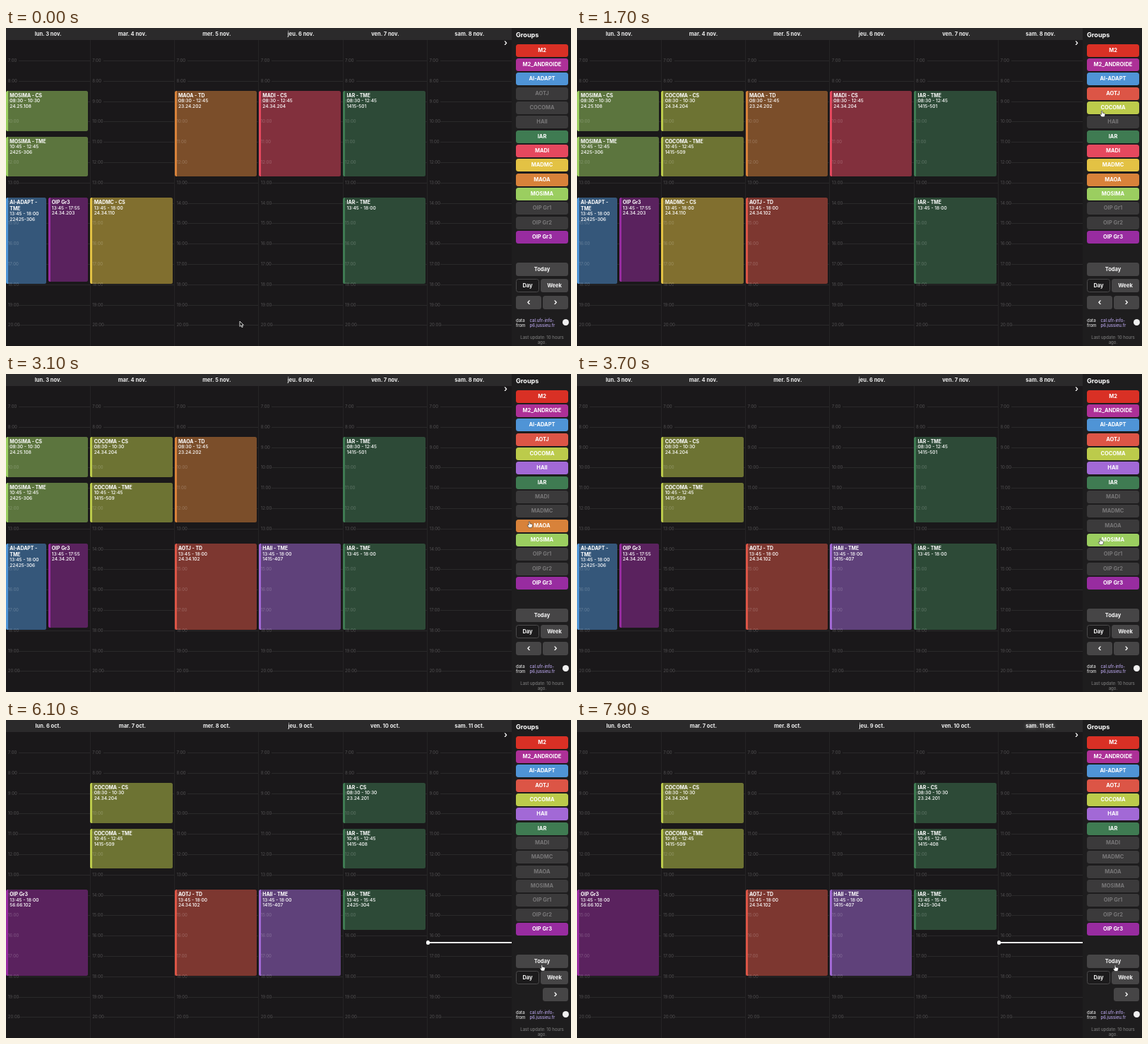
Animation of 800x450 px, one loop 8000 ms. Source, as an HTML page:

```html
<!DOCTYPE html>
<html lang="fr">
<head>
<meta charset="utf-8">
<title>Calendar</title>
<style>
  html, body { margin: 0; width: 100%; height: 100%; overflow: hidden; background: #1a181a; }
  #stage { position: relative; width: 800px; height: 450px; overflow: hidden; background: #1a181a;
    color: #fff; font: 600 7.5px/1 Inter, "Liberation Sans", sans-serif; cursor: default; }
  #stage div, #stage svg { position: absolute; box-sizing: border-box; white-space: nowrap; }
  .head { top: 0; height: 17px; width: 119.33px; line-height: 17px; text-align: center; background: #2b2a2b; color: #eee; font-weight: 700; }
  .head.today { text-shadow: 0 0 5px #999; }
  .vline { top: 17px; width: 1px; height: 433px; background: #252425; }
  .hline { height: 1px; width: 101px; background: #2a292a; }
  .hour { font-size: 6px; font-weight: 400; line-height: 8px; color: rgba(255, 255, 255, .24); }
  .event { border-radius: 2.5px; border-left: 3px solid var(--c); padding: 3.1px 1px 0 2.3px;
    background: color-mix(in srgb, var(--c) 51%, #1a181a); font-size: 6.6px; line-height: 7.5px; font-weight: 500; }
  #stage .event { white-space: normal; }
  .event b { font-weight: 700; font-size: 6.9px; }
  #side { left: 716px; top: 0; width: 84px; height: 450px; background: #1e1d1e; }
  .btn { height: 18px; border-radius: 3.5px; text-align: center; line-height: 18px; font-weight: 700; background: #3b3a3b; color: #787778; }
  .nav { height: 19px; line-height: 19px; background: #464546; color: #f4f4f4; }
  .nav.active { background: #1c1b1c; border: 1px solid #4b4a4b; line-height: 17px; }
  .arrow { font-size: 12px; line-height: 18px; }
  .small { font-size: 6px; line-height: 7px; font-weight: 500; }
  #now { left: 597px; top: 314.2px; width: 119px; height: 1.5px; background: #eee; }
  #now::before { content: ""; position: absolute; left: -2.5px; top: -2px; width: 5.6px; height: 5.6px; border-radius: 50%; background: #fff; }
</style>
</head>
<body>
<div id="stage"></div>
<script>
const COL = 119.33, HOUR = 28.8, LOOP = 8000, STEP = 100;
const WEEK_JUMP = 5800;
const stage = document.getElementById('stage');

function add(parent, cls, box, text) {
  const el = document.createElement('div');
  el.className = cls;
  for (const k in box) el.style[k] = box[k] + 'px';
  if (text) el.textContent = text;
  parent.append(el);
  return el;
}
const show = (el, on) => { el.style.display = on ? '' : 'none'; };
const hourY = h => 46 + (h - 7) * HOUR;
const toHours = s => { const [h, m] = s.split(':'); return +h + m / 60; };

// name, colour, starts on, toggle time
const groups = [
  ['M2', '#d93025', 1], ['M2_ANDROIDE', '#ad3097', 1], ['AI-ADAPT', '#4f94d6', 1],
  ['AOTJ', '#dc5546', 0, 1500], ['COCOMA', '#bccb4b', 0, 900], ['HAII', '#a269d6', 0, 1900],
  ['IAR', '#3f7b52', 1], ['MADI', '#e5485e', 1, 2400], ['MADMC', '#e3c244', 1, 2900],
  ['MAOA', '#d8823a', 1, 3250], ['MOSIMA', '#9bce60', 1, 3600], ['OIP Gr1', '#888', 0],
  ['OIP Gr2', '#888', 0], ['OIP Gr3', '#982ca0', 1]
].map(([name, color, on, at = Infinity]) => ({ name, color, on, at }));
const byName = Object.fromEntries(groups.map(g => [g.name, g]));
const isOn = (g, t) => (t >= g.at) !== !!g.on;

// group | column | start | end | type | room | half column
const weeks = [`
MOSIMA|0|08:30|10:30|CS|24.25.108
MOSIMA|0|10:45|12:45|TME|2425-306
AI-ADAPT|0|13:45|18:00|TME|22425-306|1
OIP Gr3|0|13:45|17:55||24.34.203|2
COCOMA|1|08:30|10:30|CS|24.34.204
COCOMA|1|10:45|12:45|TME|1415-509
MADMC|1|13:45|18:00|CS|24.34.110
MAOA|2|08:30|12:45|TD|23.24.202
AOTJ|2|13:45|18:00|TD|24.34.102
MADI|3|08:30|12:45|CS|24.34.204
HAII|3|13:45|18:00|TME|1415-407
IAR|4|08:30|12:45|TME|1415-501
IAR|4|13:45|18:00|TME|`, `
OIP Gr3|0|13:45|18:00||56.66.102
COCOMA|1|08:30|10:30|CS|24.34.204
COCOMA|1|10:45|12:45|TME|1415-509
AOTJ|2|13:45|18:00|TD|24.34.102
HAII|3|13:45|18:00|TME|1415-407
IAR|4|08:30|10:30|CS|23.24.201
IAR|4|10:45|12:45|TME|1415-408
IAR|4|13:45|15:45|TME|2425-304`];

const days = ['lun.', 'mar.', 'mer.', 'jeu.', 'ven.', 'sam.'];
const heads = days.map((d, i) => {
  if (i) add(stage, 'vline', { left: i * COL - .5 });
  for (let h = 7; h <= 20; h++) add(stage, 'hline', { left: i * COL + 18.3, top: Math.round(hourY(h)) });
  return add(stage, 'head', { left: i * COL });
});

const events = weeks.flatMap((list, week) => list.trim().split('\n').map(row => {
  const [name, col, start, end, type, room, half] = row.split('|');
  const top = hourY(toHours(start)) - .3;
  const el = add(stage, 'event', {
    left: col * COL + (half === '2' ? 59.5 : 0), top,
    width: half ? 56.8 : 116.2, height: hourY(toHours(end)) - top - 1.2
  });
  el.style.setProperty('--c', byName[name].color);
  const title = document.createElement('b');
  title.textContent = type ? `${name} - ${type}` : name;
  el.append(title);
  for (const line of [`${start} - ${end}`, room]) el.append(document.createElement('br'), line);
  return { el, week, group: byName[name] };
}));

for (let c = 0; c < 6; c++) for (let h = 7; h <= 20; h++) {
  add(stage, 'hour', { left: c * COL + 2.8, top: hourY(h) - 4 }, h + ':00');
}
const nowLine = add(stage, '', {});
nowLine.id = 'now';
add(stage, 'arrow', { left: 705, top: 12 }, '›');

const side = add(stage, '', {});
side.id = 'side';
add(side, '', { left: 6, top: 4.5, fontSize: 9.1 }, 'Groups').style.fontWeight = 700;
groups.forEach((g, i) => {
  g.btn = add(side, 'btn', { left: 6, top: 22.6 + i * 20.34, width: 74 }, g.name);
});
const nav = (left, top, width, text, cls = '') => add(side, 'btn nav ' + cls, { left, top, width }, text);
nav(6, 331.5, 74, 'Today');
const dayBtn = nav(6, 354.5, 33, 'Day');
nav(41, 354.5, 39, 'Week');
const prevBtn = nav(6, 378.5, 36, '‹', 'arrow');
nav(44, 378.5, 36, '›', 'arrow');

function small(left, top, text, color) {
  add(side, 'small', { left, top }, text).style.color = color;
}
small(6, 410, 'data', '#ddd');
small(6, 417, 'from', '#ddd');
small(25.5, 410, 'cal.ufr-info-', '#b5a2e6');
small(25.5, 417, 'p6.jussieu.fr', '#b5a2e6');
add(side, '', { left: 71.5, top: 411.5, width: 9, height: 9, borderRadius: 5 }).style.background = '#f0f0f0';
['Last update: 10 hours', 'ago.'].forEach((s, i) => {
  const el = add(side, 'small', { left: 0, top: 433.5 + i * 7, width: 86 }, s);
  el.style.textAlign = 'center';
  el.style.color = '#777';
});

stage.insertAdjacentHTML('beforeend', `
  <svg id="arrow" width="10" height="12" viewBox="-1 -1 10 12">
    <path d="M0 0V7.4L1.8 5.8 3 8.6 4.3 8 3.1 5.3H5.4Z" fill="#111" stroke="#fff" stroke-width=".8"/></svg>
  <svg id="hand" width="11" height="12" viewBox="-4 -1 11 12">
    <path d="M-.8 .3Q0-.6 .7 .3L.9 3Q4.6 3 4.5 4.5L4 7.2 3.2 8.6H-.6L-2.9 5.2Q-2.4 4.2-.8 5Z"
      fill="#fff" stroke="#222" stroke-width=".6"/></svg>`);
const arrow = document.getElementById('arrow'), hand = document.getElementById('hand');

// time, x, y of the pointer tip
const path = [
  [0, 331, 415], [800, 745, 118], [1050, 745, 118], [1400, 744, 92], [1550, 744, 92],
  [1800, 743, 131], [2000, 743, 131], [2300, 741, 171], [2500, 741, 171], [2800, 741, 192],
  [2950, 741, 192], [3150, 741, 212], [3300, 741, 212], [3550, 741, 233], [4200, 741, 233],
  [5000, 722, 336], [5450, 757, 342], [5900, 757, 342], [6500, 764, 359], [6800, 764, 359],
  [7250, 742, 362], [7450, 742, 362], [7900, 762, 347], [8000, 762, 347]
];
function pointer(t) {
  const i = path.findIndex(p => p[0] > t);
  const [t0, x0, y0] = path[i - 1], [t1, x1, y1] = path[i];
  const u = (t - t0) / (t1 - t0), e = u * u * (3 - 2 * u);
  return [x0 + (x1 - x0) * e, y0 + (y1 - y0) * e];
}

function draw(t) {
  const week = t >= WEEK_JUMP ? 1 : 0;
  heads.forEach((el, i) => {
    el.textContent = `${days[i]} ${i + (week ? 6 : 3)} ${week ? 'oct.' : 'nov.'}`;
    el.classList.toggle('today', i === 5 && t >= 6700);
  });
  for (const ev of events) show(ev.el, ev.week === week && isOn(ev.group, t));
  for (const g of groups) {
    // a button switched off dims a little after its events go
    const on = isOn(g, g.on ? t - 100 : t);
    g.btn.style.background = on ? g.color : '';
    g.btn.style.color = on ? '#fff' : '';
  }
  show(nowLine, week);
  show(prevBtn, !week);
  dayBtn.classList.toggle('active', t < 6500 || t >= 7400);

  const [x, y] = pointer(t), overSide = x > 721;
  show(arrow, !overSide);
  show(hand, overSide);
  arrow.style.transform = `translate(${x - 1}px, ${y - 1}px)`;
  hand.style.transform = `translate(${x - 4}px, ${y - 1}px)`;
}
byName.MOSIMA.at = 3650;
arrow.style.left = arrow.style.top = hand.style.left = hand.style.top = 0;

function tick() {
  draw(Math.floor(performance.now() % LOOP / STEP) * STEP);
  requestAnimationFrame(tick);
}
tick();
</script>
</body>
</html>
```
